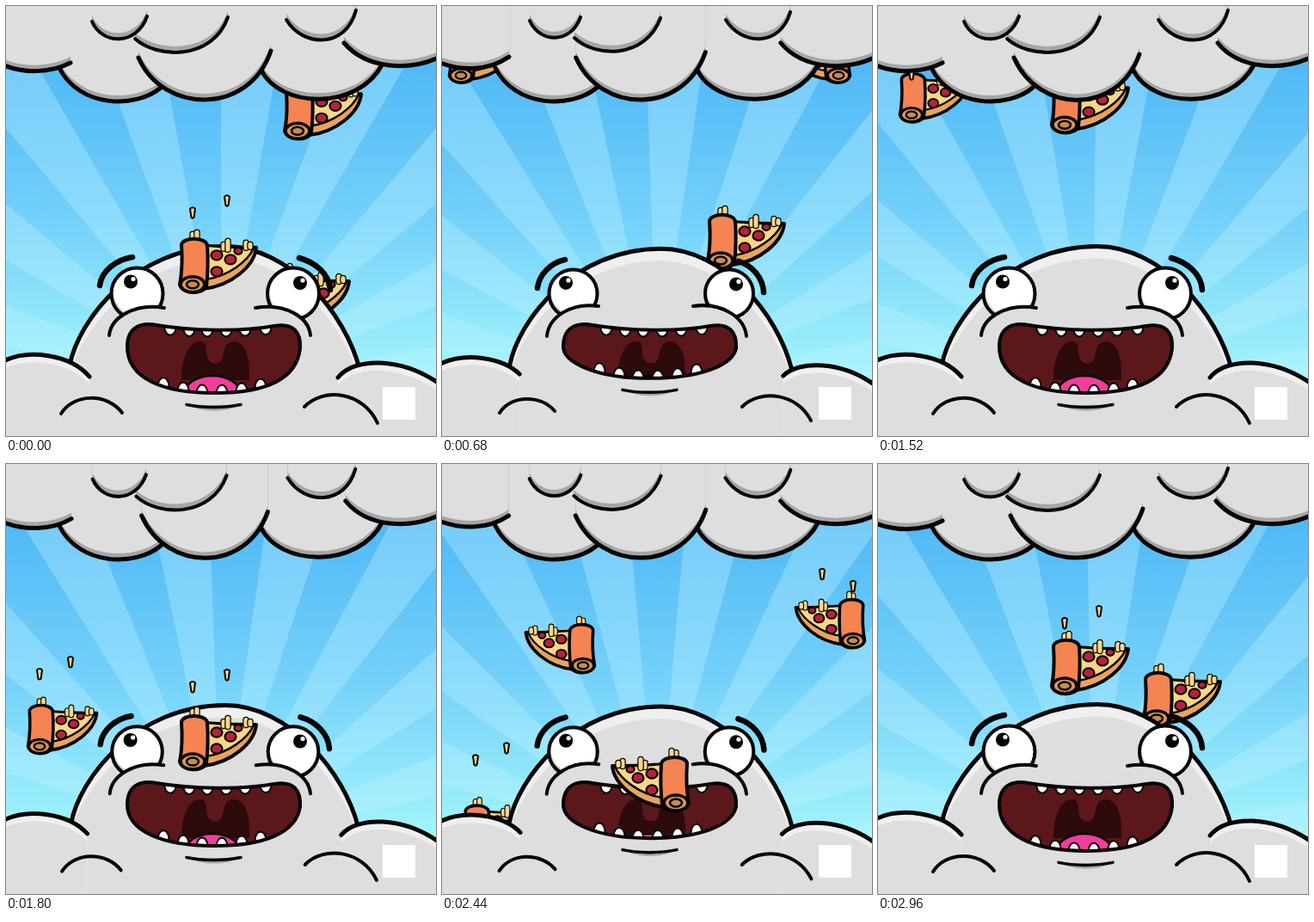
Write an HTML page with a canvas that moves like this. It is 500 px wide and 500 px high and loops after 3000 ms.

```html
<!DOCTYPE html>
<html lang="en">
<head>
<meta charset="utf-8">
<title>Hungry cloud</title>
<style>
html, body { margin: 0; width: 100%; height: 100%; overflow: hidden; background: #7fd6fa; }
canvas { display: block; width: 500px; height: 500px; }
</style>
</head>
<body>
<canvas id="stage" width="500" height="500"></canvas>
<script>
const ctx = document.getElementById('stage').getContext('2d');
const TAU = Math.PI * 2;
const INK = '#050505', BASE = '#dedede', RIM = '#efefef', SHADE = '#a6a6a6';
const LOOP = 3000, STEP = 40;

// x of the roll, step at which it passes y = 291, scale, mirrored, drops, falls into the mouth
const slices = [
  [325, -2.07, 1, 0, 0, 0], [217, -0.97, 1, 0, 1, 1],
  [339, 5.1, 1, 0, 0, 0], [324, 16.85, 1, 0, 0, 0],
  [22, 25.1, .9, 0, 0, 0], [461, 25.1, .9, 1, 1, 0],
  [181, 31.1, 1, 1, 0, 0], [217, 43.4, 1, 0, 1, 1],
  [39, 43.9, .9, 0, 1, 0], [39, 56.8, .9, 0, 1, 0],
  [272, 58.1, 1, 1, 0, 1], [164, 62.8, .9, 1, 0, 0],
  [478, 63.8, .9, 1, 1, 0], [324, 73.85, 1, 0, 0, 0],
  [217, 75.03, 1, 0, 1, 1]
];

let open = 1;
const mix = (shut, wide) => shut + (wide - shut) * open;
const mixAll = (shut, wide) => shut.map((v, i) => mix(v, wide[i]));

function pen(width, color = INK) {
  ctx.lineWidth = width;
  ctx.strokeStyle = color;
  ctx.lineCap = ctx.lineJoin = 'round';
}

function trace(p) {
  ctx.beginPath();
  ctx.moveTo(p[0], p[1]);
  for (let i = 2; i < p.length; i += 6) ctx.bezierCurveTo(...p.slice(i, i + 6));
}

function line(p, width) {
  pen(width);
  trace(p);
  ctx.stroke();
}

function oval(x, y, rx, ry, fill, width = 0) {
  ctx.beginPath();
  ctx.ellipse(x, y, rx, ry, 0, 0, TAU);
  ctx.fillStyle = fill;
  ctx.fill();
  if (width) { pen(width); ctx.stroke(); }
}

// a curve filled up or down to the level "to", with a band of another tone along it
function puff(p, to, edge, shift, width = 5) {
  const body = () => {
    trace(p);
    ctx.lineTo(p[p.length - 2], to);
    ctx.lineTo(p[0], to);
    ctx.closePath();
  };
  ctx.save();
  body();
  ctx.fillStyle = edge;
  ctx.fill();
  ctx.clip();
  ctx.translate(0, shift);
  body();
  ctx.fillStyle = BASE;
  ctx.fill();
  ctx.restore();
  line(p, width);
}

function sky(t) {
  const g = ctx.createLinearGradient(0, 60, 0, 430);
  g.addColorStop(0, '#4fb8f6');
  g.addColorStop(.5, '#73d0fa');
  g.addColorStop(1, '#a2f4fb');
  ctx.fillStyle = g;
  ctx.fillRect(0, 0, 500, 500);
  ctx.fillStyle = 'rgba(190,240,255,.34)';
  const period = TAU / 18, turn = t / LOOP * period * 4;
  for (let i = 0; i < 18; i++) {
    const a = turn + i * period - Math.PI / 2;
    ctx.beginPath();
    ctx.moveTo(250, 440);
    ctx.lineTo(250 + 800 * Math.cos(a), 440 + 800 * Math.sin(a));
    ctx.lineTo(250 + 800 * Math.cos(a + period / 2), 440 + 800 * Math.sin(a + period / 2));
    ctx.fill();
  }
}

function drip(x, y, h) {
  ctx.beginPath();
  ctx.roundRect(x - 2.5, y, 5, h, 2.5);
  pen(2.5);
  ctx.stroke();
  ctx.fillStyle = '#fbd68c';
  ctx.fill();
}

function pizza(x, y, size, flip) {
  ctx.save();
  ctx.translate(x, y);
  ctx.scale(flip ? -size : size, size);
  drip(0, -61, 14);
  drip(5, -63, 14);
  // crust, then cheese
  pen(4);
  trace([15, -45, 35, -43, 55, -43, 74, -43, 72, -22, 46, 1, 13, 5]);
  ctx.closePath();
  ctx.fillStyle = '#e7a45b';
  ctx.fill();
  ctx.stroke();
  trace([16, -45, 35, -43, 55, -43, 71, -42, 64, -27, 42, -10, 16, -6]);
  ctx.closePath();
  ctx.fillStyle = '#fbd783';
  ctx.fill();
  pen(2.5);
  ctx.stroke();
  for (const [px, py, r] of [[28, -34, 6.5], [44, -29, 6.5], [28, -15, 6.5], [53, -39, 4.5]])
    oval(px, py, r, r * .86, '#b5233b', 2.2);
  for (const [dx, dy, h] of [[36, -49, 10], [41, -53, 15], [62, -51, 11], [67, -49, 8]])
    drip(dx, dy, h);
  // rolled end
  trace([-13, -46, -12, -55, 14, -56, 17, -46, 18, -32, 18, -15, 16, 2, 12, 12, -12, 12, -15, 0, -12, -15, -12, -32, -13, -46]);
  ctx.fillStyle = '#f58453';
  ctx.fill();
  pen(4);
  ctx.stroke();
  oval(0, 0, 14, 9, '#d99556', 3.5);
  oval(0, 0, 7, 4.5, '#c68c4d', 2.5);
  ctx.restore();
}

function drop(x, y) {
  ctx.beginPath();
  ctx.moveTo(x - 3, y - 5);
  ctx.quadraticCurveTo(x, y - 8, x + 3, y - 5);
  ctx.lineTo(x + 1.6, y + 5);
  ctx.quadraticCurveTo(x, y + 7, x - 1.6, y + 5);
  ctx.closePath();
  ctx.fillStyle = '#fbd08a';
  ctx.fill();
  pen(2);
  ctx.stroke();
}

function fall(step, front) {
  for (const [x, cross, size, flip, wet, eaten] of slices) {
    const s = step - cross;
    if (eaten !== front || s < -11 || s > 9) continue;
    const y = 291 + 33 * s + .87 * s * s;
    pizza(x, y, size, flip);
    if (wet && s > -6) {
      const lag = 78 + 5.3 * s;
      drop(x, y - lag);
      drop(x + (flip ? -40 : 40) * size, y - lag - 14);
    }
  }
}

function topClouds(t) {
  const q = 2 * Math.cos(TAU * t / LOOP);
  const up = (p, w) => puff(p, -60, SHADE, -7, w);
  ctx.fillStyle = BASE;
  ctx.fillRect(0, 0, 500, 45);
  up([62, 72, 85, 118, 150, 120, 180, 95]);
  up([296, 73, 318, 120, 410, 122, 438, 67]);
  up([156 - q, 60, 185 - q, 126, 281 + q, 127, 306 + q, 54 - q]);
  up(mixAll([-5, 65, 20, 75, 52, 77, 78, 59], [-5, 68, 20, 79, 52, 78, 75, 66]));
  up([394 - q / 2, 43, 420, 74, 470, 76, 505, 59]);
  up(mixAll([154, 37, 178, 60, 236, 62, 254, 14], [150, 38, 175, 61, 240, 64, 258, 13]), 4);
  up(mixAll([102, 17, 114, 44, 150, 44, 161, 13], [100, 18, 112, 46, 152, 46, 164, 12]), 4);
  up(mixAll([330, 16, 348, 46, 393, 48, 405, 7], [326, 16, 345, 48, 395, 50, 407, 5]), 4);
}

function eye(x, px, py, r) {
  ctx.save();
  ctx.beginPath();
  ctx.arc(x, 334.5, r, 0, TAU);
  ctx.fillStyle = '#c9c9c9';
  ctx.fill();
  ctx.clip();
  oval(x + 2, 331, r, r, '#fff');
  ctx.restore();
  ctx.beginPath();
  ctx.arc(x, 334.5, r, 0, TAU);
  pen(4);
  ctx.stroke();
  oval(px, py, 8, 8, INK);
  oval(px + 3, py - 3, 2.6, 2.6, '#fff');
}

function cheek(p, inner) {
  trace(p);
  ctx.lineTo(inner, 386);
  ctx.lineTo(p[0], 386);
  ctx.fillStyle = BASE;
  ctx.fill();
  line(p, 4);
}

function mouthPath(b) {
  trace([141, 396, 141, 372, 158, 368, 175, 371, 215, 378, 275, 379, 312, 372,
    335, 368, 343, 380, 342, 398, 338, b - 15, 300, b, 242, b, 180, b, 141, b - 18, 141, 396]);
  ctx.closePath();
}

function mouth(step) {
  const b = mix(432.5, 450);
  ctx.save();
  mouthPath(b);
  ctx.fillStyle = '#5b1719';
  ctx.fill();
  ctx.clip();
  // throat and uvula
  trace([204, 435, 204, 415, 210, 390, 226, 390, 234, 390, 232, 400, 234, 408,
    236, 418, 250, 418, 252, 408, 254, 398, 255, 390, 266, 390, 280, 392, 284, 412, 283, 435]);
  ctx.fillStyle = '#2d0a0c';
  ctx.fill();
  for (const x of [191, 213, 234, 256, 278, 302]) {
    const k = (x - 242) / 100;
    oval(x, 376 - 7 * k * k, 6.5, 8.5, '#fff', 2);
  }
  ctx.restore();
  line([141, 396, 141, 372, 158, 368, 175, 371, 215, 378, 275, 379, 312, 372, 335, 368, 343, 380, 342, 398], 4);

  // slices drop behind the lower lip
  ctx.save();
  const gap = new Path2D();
  gap.rect(0, 0, 500, 396);
  gap.moveTo(141, 395);
  gap.lineTo(342, 395);
  gap.bezierCurveTo(338, b - 15, 300, b, 242, b);
  gap.bezierCurveTo(180, b, 141, b - 18, 141, 395);
  ctx.clip(gap);
  fall(step, 1);
  ctx.restore();

  ctx.save();
  mouthPath(b);
  ctx.clip();
  oval(240, 450, 32, 20, '#f33d9b', 2.5);
  for (const x of [183, 206, 228, 251, 274, 296]) {
    const k = (x - 242) / 60;
    oval(x, b + 1 - 9 * k * k, 6.5, 10, '#fff', 2);
  }
  ctx.restore();
  line([342, 398, 338, b - 15, 300, b, 242, b, 180, b, 141, b - 18, 141, 396], 4);

  const c = mix(446, 463.5);
  trace([214, c + 1, 228, c + 9, 256, c + 9, 270, c + 1]);
  ctx.fillStyle = SHADE;
  ctx.fill();
  line([210, c, 228, c + 4, 254, c + 4, 273, c], 3.5);
}

function face(step) {
  const sx = mix(.972, 1), sy = mix(.98, 1);
  const head = [74, 418, 84, 365, 150, 279.5, 255, 279.5, 330, 279.5, 395, 358, 411, 422]
    .map((v, i) => i % 2 ? 420 + (v - 420) * sy : 245 + (v - 245) * sx);
  puff(head, 520, RIM, 14);

  const r = mix(28, 30);
  eye(152.5, mix(144, 145), mix(322, 320.5), r);
  eye(334, 342, mix(323.5, 322), r);
  cheek(mixAll([122, 384, 124, 362, 150, 344, 182, 349], [120, 383, 122, 362, 150, 345, 184, 351]), 184);
  cheek(mixAll([354, 384, 352, 362, 325, 344, 292, 349], [354, 383, 352, 362, 325, 345, 290, 351]), 290);
  line(mixAll([111, 328, 113, 312, 126, 299, 143, 295], [109, 325, 111, 308, 128, 295, 147, 292]), 6.5);
  line(mixAll([345, 297, 361, 302, 373, 316, 374, 333], [341, 293, 360, 298, 376, 312, 377, 330]), 6.5);
  mouth(step);
}

function bottomClouds() {
  const down = (p, w) => puff(p, 540, RIM, 9, w);
  down(mixAll([-5, 418, 25, 401, 71, 409, 90, 428], [-5, 414, 25, 398, 75, 405, 97, 431]));
  down(mixAll([397, 430, 415, 412, 465, 412, 505, 442], [386, 432, 405, 408, 460, 408, 505, 440]));
  const left = mixAll([67, 473, 81, 452, 115, 452, 131, 471], [64, 474, 79, 450, 118, 450, 135, 473]);
  const right = mixAll([349, 466, 370, 445, 413, 450, 429, 482], [347, 466, 369, 443, 415, 448, 432, 485]);
  line(left, 4);
  line(right, 4);
}

function draw(now) {
  let step = Math.floor(now % LOOP / STEP);
  if (step % 25 === 12) step--; // one held picture per second
  const t = step * STEP;
  open = (1 + Math.cos(TAU * t / 1500)) / 2;
  sky(t);
  fall(step, 0);
  face(step);
  bottomClouds();
  topClouds(t);
  ctx.fillStyle = '#fff';
  ctx.fillRect(438, 443, 38, 38);
}

const start = performance.now();
function tick() {
  draw(performance.now() - start);
  requestAnimationFrame(tick);
}
tick();
</script>
</body>
</html>
```
